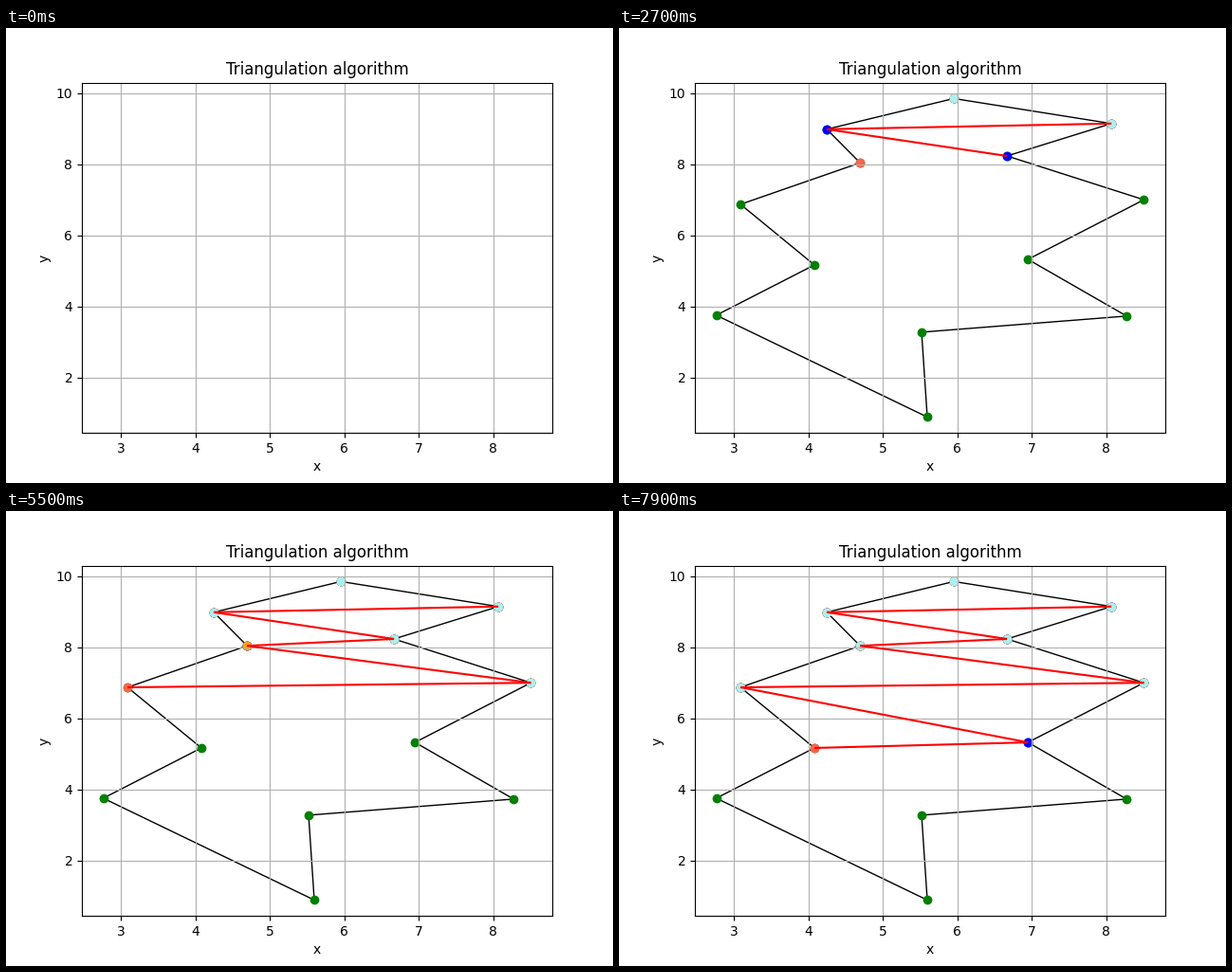
Recreate the animation shown at these times as a matplotlib script. Size 640 by 480 pixels, loop 8000 ms.

```python
import matplotlib.pyplot as plt
from matplotlib.animation import FuncAnimation
from matplotlib.collections import LineCollection
from matplotlib.patches import Polygon

FRAMES, INTERVAL = 80, 100
CYCLE = 11  # frames spent on one sweep vertex

# Key points of the y-monotone polygon, counter-clockwise from the top
LEFT = [(5.951, 9.849), (4.244, 8.985), (4.692, 8.041), (3.086, 6.873),
        (4.078, 5.167), (2.76, 3.753), (5.594, 0.889)]
RIGHT = [(5.518, 3.276), (8.272, 3.729), (6.947, 5.324), (8.504, 7.001),
         (6.665, 8.233), (8.067, 9.145)]
OUTLINE = LEFT + RIGHT
PTS = sorted(OUTLINE, key=lambda p: -p[1])  # sweep order

fig, ax = plt.subplots(figsize=(6.4, 4.8), dpi=100)
ax.set_title("Triangulation algorithm")
ax.set_xlabel("x")
ax.set_ylabel("y")
ax.grid(True)

steps = []  # (first frame, end frame, artist)


def show(artist, start, end=FRAMES):
    steps.append((start, end, artist))


def mark(points, color, start, end=FRAMES):
    show(ax.scatter(*zip(*points), color=color), start, end)


def diagonal(a, b, start):
    line = LineCollection([[a, b]], colors="red")
    show(ax.add_collection(line), start)


def sweep(below, top, cur, start):
    """Clear both stacked vertices, then stack the top and current ones."""
    mark([cur], "tomato", start, start + CYCLE - 1)
    mark([top], "orange", start + 1)
    diagonal(cur, top, start + 2)
    mark([top], "paleturquoise", start + 3)
    mark([below], "orange", start + 4)
    mark([below], "paleturquoise", start + 7)
    mark([top], "blue", start + 8)
    mark([cur], "blue", start + 9)


outline = Polygon(OUTLINE, fill=False, edgecolor="black")
show(ax.add_patch(outline), 1)
mark(PTS, "green", 2)
mark(PTS[:1], "blue", 3)
mark(PTS[1:2], "blue", 4)
for k, start in enumerate(range(5, FRAMES, CYCLE)):
    sweep(*PTS[k:k + 3], start)


def update(frame):
    for start, end, artist in steps:
        artist.set_visible(start <= frame < end)
    return [artist for _, _, artist in steps]


anim = FuncAnimation(fig, update, frames=FRAMES, interval=INTERVAL,
                     repeat=True, repeat_delay=0, blit=False)
plt.show()
```
